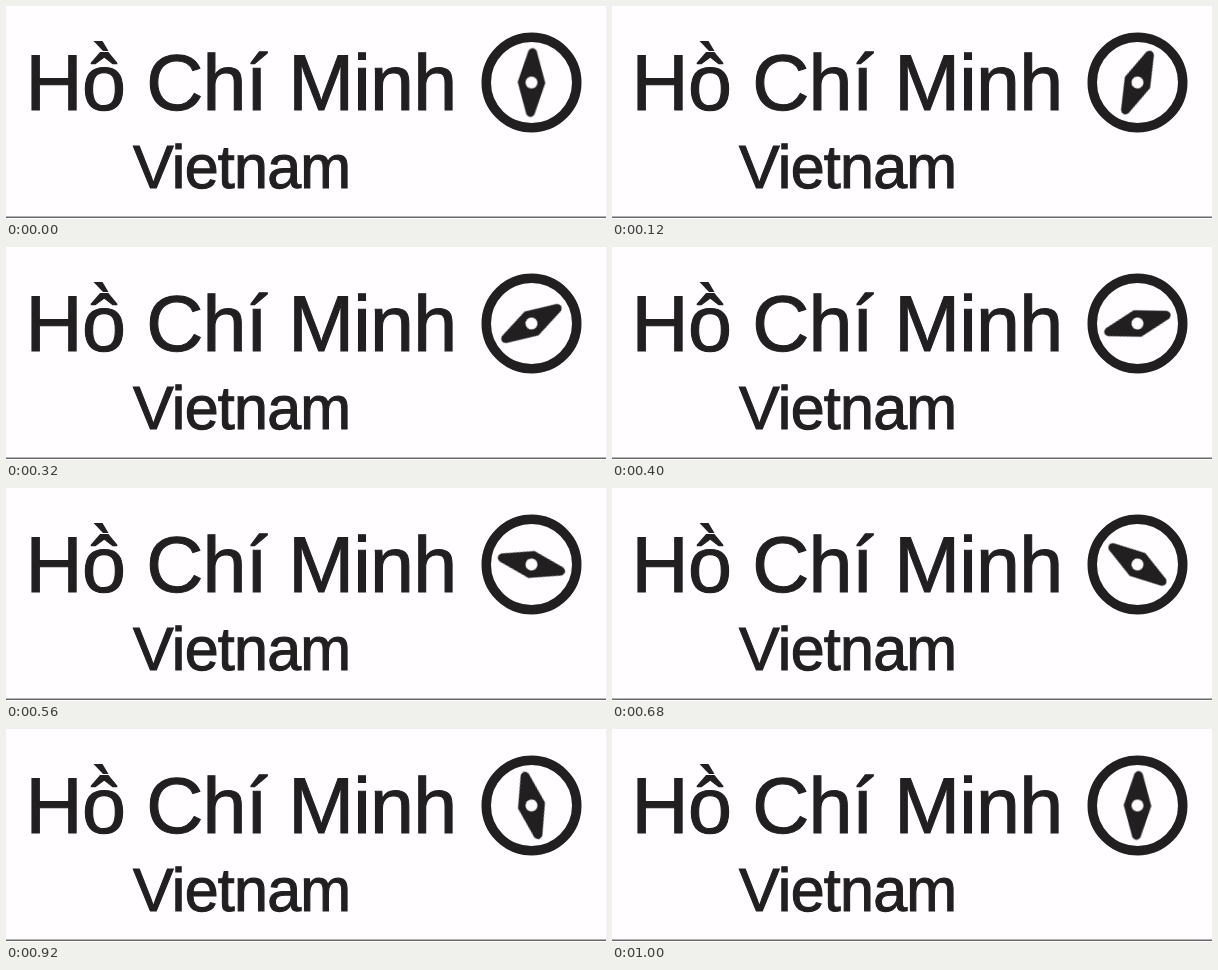
These frames come from a looping animation (600 px wide and 213 px high, 1040 ms). An HTML page:

```html
<!DOCTYPE html>
<html lang="vi">
<head>
<meta charset="utf-8">
<title>Hồ Chí Minh, Vietnam</title>
<style>
  html, body {
    margin: 0;
    width: 100%;
    height: 100%;
    overflow: hidden;
    background: #fffdff;
  }
  svg { display: block; width: 100%; height: 100%; }
  text {
    font-family: "Liberation Sans", Arial, sans-serif;
    letter-spacing: -0.75px;
    text-rendering: geometricPrecision;
    stroke: #221f21;
    stroke-width: 1.1;
  }
  .ink { fill: #221f21; }
  .ring { fill: none; stroke: #221f21; stroke-width: 9.5; }
  .hole { fill: #fffdff; }
  /* A half turn in 26 poses of 40 ms, both ends included */
  .needle { animation: turn 1040ms steps(26, jump-none) infinite; }
  @keyframes turn {
    from { transform: rotate(2deg); }
    to { transform: rotate(182deg); }
  }
</style>
</head>
<body>
<svg viewBox="0 0 600 213">
  <!-- The grave accent sits above the circumflex, so it is drawn apart -->
  <text class="ink" x="19.6" y="104.3" font-size="79" aria-label="Hồ Chí Minh">Hô Chí Minh</text>
  <path class="ink" d="M87.5 35 H96.5 L102.5 45 H97 Z"/>
  <text class="ink" x="127" y="182" font-size="61">Vietnam</text>
  <rect y="210.5" width="600" height="1.5" fill="#6a686a"/>
  <g transform="translate(525.5 76.5)">
    <circle class="ring" r="45.25"/>
    <g class="needle">
      <path class="ink" d="M-13.8 0 L-4 -32 Q0 -37 4 -32 L13.8 0 L4 32 Q0 37 -4 32 Z"/>
      <circle class="hole" r="6"/>
    </g>
  </g>
</svg>
</body>
</html>
```
